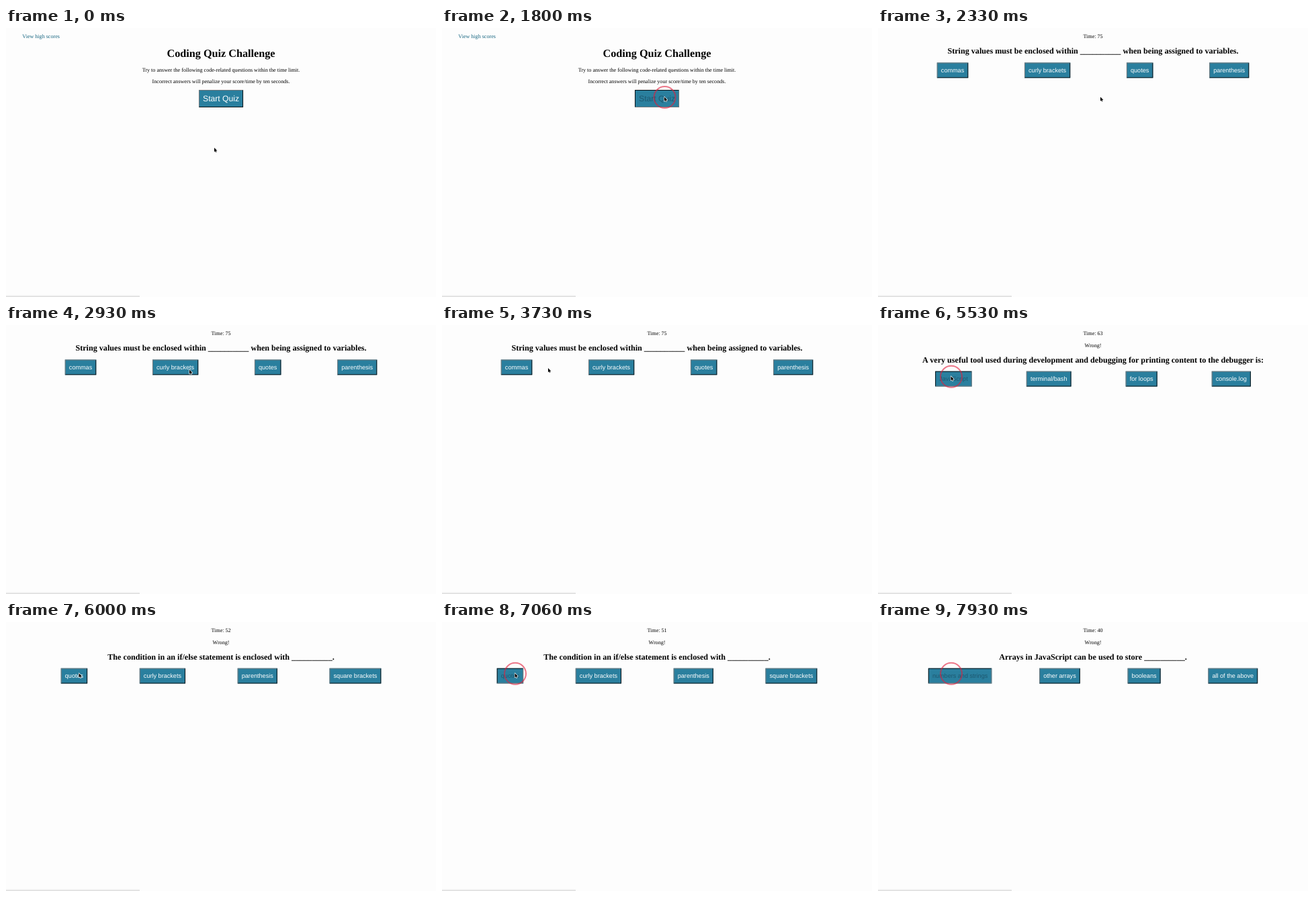
These frames come from a looping animation (640x400 px, 8000 ms). An HTML page with a canvas:

```html
<!DOCTYPE html>
<html lang="en">
<head>
<meta charset="utf-8">
<title>Coding Quiz Challenge</title>
<style>
  html, body { margin: 0; width: 100%; height: 100%; overflow: hidden; background: #fdfdfd; }
  canvas { display: block; width: 640px; height: 400px; }
</style>
</head>
<body>
<canvas id="stage" width="640" height="400"></canvas>
<script>
const ctx = document.getElementById('stage').getContext('2d');
const W = 640, H = 400, LOOP = 8000;
const ZOOM = 0.506;            // page pixels to stage pixels
const px = n => n * ZOOM;
const SERIF = '"Liberation Serif", "Times New Roman", serif';
const SANS = '"Liberation Sans", Arial, sans-serif';
const BODY = `${px(16)}px ${SERIF}`;
const TITLE = `bold ${px(32)}px ${SERIF}`;
const HEADING = `bold ${px(24)}px ${SERIF}`;
const ANSWER = `${px(18)}px ${SANS}`;
const START = `${px(24)}px ${SANS}`;

const questions = [
  { at: 1895, text: 'String values must be enclosed within __________ when being assigned to variables.',
    answers: ['commas', 'curly brackets', 'quotes', 'parenthesis'] },
  { at: 4540, text: 'A very useful tool used during development and debugging for printing content to the debugger is:',
    answers: ['JavaScript', 'terminal/bash', 'for loops', 'console.log'] },
  { at: 5660, text: 'The condition in an if/else statement is enclosed with __________.',
    answers: ['quotes', 'curly brackets', 'parenthesis', 'square brackets'] },
  { at: 7860, text: 'Arrays in JavaScript can be used to store __________.',
    answers: ['numbers and strings', 'other arrays', 'booleans', 'all of the above'] }
];

// [time, seconds left]
const clock = [[0, 75], [3895, 74], [4895, 63], [5895, 52], [6895, 51], [7895, 40]];

// [from, to] of each mouse press
const presses = [[1730, 1895], [4400, 4540], [5460, 5660], [6990, LOOP]];

// [time, x, y] of the pointer tip
const path = [
  [0, 310, 178], [60, 310, 178], [480, 341, 124], [860, 333, 104], [1260, 331, 102.5],
  [2560, 331, 102.5], [2930, 273, 66.5], [3400, 190, 65], [4230, 98.5, 62.5],
  [4620, 98.5, 62.5], [5120, 108.5, 76.2], [LOOP, 108.5, 76.2]
];

const last = (list, test) => list.filter(test).pop();

function pointerAt(t) {
  const i = Math.max(1, path.findIndex(p => p[0] > t));
  const [t0, x0, y0] = path[i - 1], [t1, x1, y1] = path[i];
  const u = (t - t0) / (t1 - t0), e = u * u * (3 - 2 * u);
  return { x: x0 + (x1 - x0) * e, y: y0 + (y1 - y0) * e };
}

function label(text, x, y, font, color = '#000', align = 'center') {
  ctx.font = font;
  ctx.fillStyle = color;
  ctx.textAlign = align;
  ctx.fillText(text, x, y);
}

function widthOf(text, font) {
  ctx.font = font;
  return ctx.measureText(text).width + px(24);
}

function edge(color, ...pts) {
  ctx.fillStyle = color;
  ctx.beginPath();
  pts.forEach(([x, y]) => ctx.lineTo(x, y));
  ctx.fill();
}

function button(text, x, y, w, h, baseline, font, pressed) {
  const b = px(2), r = x + w, d = y + h;
  const light = '#70777b', dark = '#0c1418';
  const first = pressed ? dark : light, second = pressed ? light : dark;
  ctx.fillStyle = '#2a7f9e';
  ctx.fillRect(x, y, w, h);
  edge(first, [x, d], [x, y], [r, y], [r - b, y + b], [x + b, y + b], [x + b, d - b]);
  edge(second, [r, y], [r, d], [x, d], [x + b, d - b], [r - b, d - b], [r - b, y + b]);
  label(text, x + w / 2, y + baseline, font, pressed ? '#1e5870' : '#fff');
}

function drawHome(pressed) {
  label('View high scores', px(48), 15.4, BODY, '#14647f', 'left');
  label('Coding Quiz Challenge', W / 2, 42.6, TITLE);
  label('Try to answer the following code-related questions within the time limit.', W / 2, 64.8, BODY);
  label('Incorrect answers will penalize your score/time by ten seconds.', W / 2, 82, BODY);
  const w = widthOf('Start Quiz', START);
  button('Start Quiz', W / 2 - w / 2, 92.1, w, px(51), 17.2, START, pressed);
}

function drawQuestion(q, seconds, pressed) {
  const shift = q === questions[0] ? 0 : 17.2;
  label('Time: ' + seconds, W / 2, 15.4, BODY);
  if (shift) label('Wrong!', W / 2, 32.6, BODY);
  label(q.text, W / 2, 38.3 + shift, HEADING);

  const margin = px(8);
  const widths = q.answers.map(a => widthOf(a, ANSWER));
  const gap = (W - 2 * margin - widths.reduce((a, b) => a + b)) / (widths.length + 1);
  let x = margin + gap;
  q.answers.forEach((a, i) => {
    button(a, x, 51.5 + shift, widths[i], px(45), 14.4, ANSWER, pressed && i === 0);
    x += widths[i] + gap;
  });
}

function drawPointer({ x, y }) {
  ctx.save();
  ctx.translate(x, y);
  ctx.scale(0.85, 0.85);
  ctx.beginPath();
  [[0, 0], [0, 7.4], [1.7, 5.8], [2.7, 8.1], [3.9, 7.6], [2.9, 5.3], [5.2, 5.3]]
    .forEach(([a, b]) => ctx.lineTo(a, b));
  ctx.closePath();
  ctx.lineWidth = 1.4;
  ctx.lineJoin = 'round';
  ctx.strokeStyle = '#fff';
  ctx.stroke();
  ctx.fillStyle = '#000';
  ctx.fill();
  ctx.restore();
}

function drawRing({ x, y }) {
  ctx.beginPath();
  ctx.arc(x + 0.5, y + 0.6, 16, 0, Math.PI * 2);
  ctx.lineWidth = 2;
  ctx.strokeStyle = 'rgba(225, 30, 60, 0.6)';
  ctx.stroke();
}

function drawStatusShadow() {
  const g = ctx.createLinearGradient(0, 397, 0, 400);
  g.addColorStop(0, 'rgba(0, 0, 0, 0)');
  g.addColorStop(1, 'rgba(0, 0, 0, 0.15)');
  ctx.fillStyle = g;
  ctx.fillRect(0, 397, 199, 3);
}

function draw(t) {
  ctx.fillStyle = '#fdfdfd';
  ctx.fillRect(0, 0, W, H);
  const q = last(questions, item => item.at <= t);
  const pressed = presses.some(([from, to]) => t >= from && t < to);
  const pointer = pointerAt(t);
  if (q) drawQuestion(q, last(clock, c => c[0] <= t)[1], pressed);
  else drawHome(pressed);
  drawStatusShadow();
  if (q !== questions[3]) drawPointer(pointer);
  if (pressed) drawRing(pointer);
}

ctx.textRendering = 'geometricPrecision';
const begin = performance.now();
function tick() {
  draw((performance.now() - begin) % LOOP);
  requestAnimationFrame(tick);
}
tick();
</script>
</body>
</html>
```
